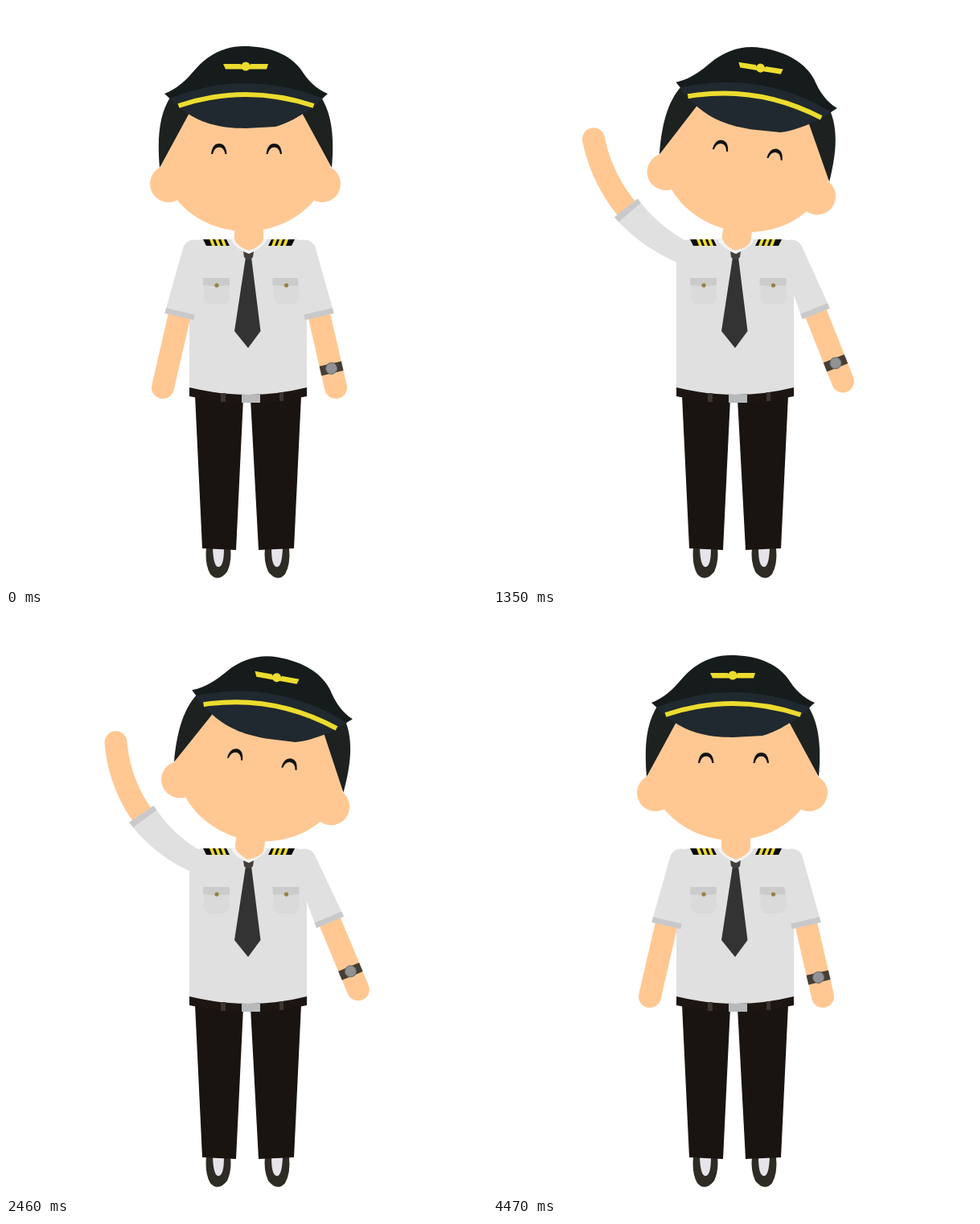
Write an HTML page that moves like this. It is 598 px wide and 722 px high and loops after 4500 ms.

```html
<!DOCTYPE html>
<html lang="en">
<head>
<meta charset="utf-8">
<title>Waving pilot</title>
<style>
  html, body { margin: 0; width: 100%; height: 100%; overflow: hidden; background: #fff; }
  svg { display: block; width: 598px; height: 722px; }
  .skin { fill: #ffc893; }
  .shirt { fill: #e0e0e0; }
  .cuff { fill: #c9c9cb; }
  .yellow { fill: #ecdc2f; }
  .hair { fill: #1d2120; }
  .cap { fill: #161b1b; }
  .pants { fill: #1a1410; }
  .fore { fill: none; stroke: #ffc893; stroke-width: 28; stroke-linecap: round; }
</style>
</head>
<body>
<svg viewBox="0 0 598 722">
  <defs>
    <g id="shoe">
      <path fill="#2d2b23" d="M249 673H279Q281 690 275 703Q264 717 254 706Q247 694 249 673z"/>
      <path fill="#e6e4ea" d="M257 674H271Q271 697 264 697Q258 697 257 674z"/>
    </g>
    <g id="pocket">
      <path fill="#dadada" d="M246 345H278V365L272 371H252L246 365z"/>
      <path fill="#cbcbcb" d="M245 338H278V347L265 348L262 351L259 348L245 347z"/>
      <circle cx="262" cy="347" r="2.6" fill="#96813f"/>
    </g>
    <g id="epaulet">
      <path fill="#08090f" d="M245 290H274L278 298H249z"/>
      <path class="yellow" d="M253 290h4l3 8h-4zM260 290h4l3 8h-4zM267 290h4l3 8h-4z"/>
    </g>
    <path id="eye" d="M255 184Q256.500 171 265 171Q273.500 171 274.500 184H272.500Q271 175.500 265 175.500Q259 175.500 257 184z" fill="#111"/>
  </defs>

  <use href="#shoe"/>
  <use href="#shoe" transform="matrix(-1 0 0 1 601 0)"/>
  <path class="pants" d="M235 484L295 488L286 676L244 674zM304 488L367 484L358 674L314 676z"/>

  <path class="shirt" d="M228 302Q232 290 245 290H359Q372 290 374 302V476Q302 492 228 476z"/>
  <path fill="#1c1512" d="M228 474Q302 492 374 474V485Q302 501 228 485z"/>
  <path fill="#3b3531" d="M267 481h6v11h-6zM340 480h5v11h-5z"/>
  <path fill="#b7b9ba" d="M293 483H316V493H293z"/>
  <use href="#pocket"/>
  <use href="#pocket" x="86.500"/>

  <g id="left"></g>
  <g id="right" transform="matrix(-1 0 0 1 605 0)"></g>

  <use href="#epaulet"/>
  <use href="#epaulet" transform="matrix(-1 0 0 1 604 0)"/>
  <path fill="#f3f3f3" d="M280 289Q280 298 302 308Q324 298 324 289z"/>

  <g id="head">
    <path class="skin" d="M284 265H320V290Q318 298 302 304Q286 298 284 290z"/>
    <circle class="skin" cx="202" cy="221" r="23"/>
    <circle class="skin" cx="393" cy="221" r="23"/>
    <path class="skin" d="M190 175C190 242 244 280 298 280S406 242 406 175L380 110H216z"/>
    <path class="hair" d="M229 131L191 201C188 165 190 135 205 112H245zM367 131L405 201C408 165 406 135 391 112H351z"/>
    <path class="cap" d="M197 109C213 103 224 92 236 78C252 60 272 50 295 50C328 50 352 60 366 78C375 92 385 103 400 109L390 118H207z"/>
    <path fill="#20292f" d="M203 115L210 122C238 145 262 152 298 152L335 150C350 146 365 137 382 126L394 115Q298 77 203 115z"/>
    <path fill="none" stroke="#ecdc2f" stroke-width="6" d="M214.500 124Q298 96 382.500 124"/>
    <path class="yellow" d="M270 72H326L324 78.500H273z"/>
    <circle class="cap" cx="298" cy="70" r="6.500"/>
    <circle class="yellow" cx="298" cy="75" r="5.500"/>
    <use href="#eye"/>
    <use href="#eye" x="68.500"/>
  </g>

  <path fill="#333" d="M298 312H305L316.500 404L301 425L284 404z"/>
  <path fill="#443f3c" d="M295 305L302 308L308 305L307 312L304 315H299L296 312z"/>
</svg>
<script>
const $ = id => document.getElementById(id);
const clamp = x => Math.min(1, Math.max(0, x));
const smooth = x => (x = clamp(x)) * x * (3 - 2 * x);
const rad = Math.PI / 180;
const LOOP = 4500, STEP = 30, REST = -77, PARTS = 50;

// Keys are [ms, value] pairs: chord elevation and bend of the waving arm, lean of the rest
const LIFT = [[735, REST], [1500, 67], [2010, 8.5], [2460, 57], [3300, REST]];
const BEND = [[980, 0], [1450, 60], [2010, 17], [2470, 58], [2900, 0]];
const LEAN = [[750, 0], [1500, 1], [2545, 1], [3300, 0]];

function ease(keys, t) {
  return keys.slice(1).reduce((v, [end, to], i) => {
    const [start, from] = keys[i];
    return t > start ? from + (to - from) * smooth((t - start) / (end - start)) : v;
  }, keys[0][1]);
}

const watch = `<g class="watch"><path fill="#453e35" d="M-14-6H14V6H-14z"/>
  <circle r="7" fill="#909294" stroke="#6b6b6b"/></g>`;
for (const id of ['left', 'right']) {
  $(id).innerHTML = `<path class="fore"/>${id === 'right' ? watch : ''}
    <circle class="shirt" cx="234" cy="305" r="14.500"/>
    <path class="shirt sleeve"/><path class="cuff"/>`;
}

// An arm is a circular arc from the shoulder; both sides share one shape
function drawArm(arm, lift, bend) {
  const len = 173.5 + 7 * clamp((lift - REST) / 80) ** 2 + 0.06 * bend;
  const pts = [];
  let x = 234, y = 305;
  for (let i = 0; i <= PARTS; i++) {
    const a = (lift + bend * (i / PARTS - 0.5)) * rad;
    const c = Math.cos(a), s = Math.sin(a);
    pts.push({ x, y, c, s, a });
    x -= c * len / PARTS;
    y -= s * len / PARTS;
  }
  const line = list => 'M' + list.map(p => p.map(v => v.toFixed(2))).join('L');
  const band = (from, to) => {
    const side = dir => pts.slice(from, to + 1).map((p, i) => {
      const w = dir * (14.5 + (from + i) / 6);
      return [p.x + p.s * w, p.y - p.c * w];
    });
    return line([...side(1), ...side(-1).reverse()]) + 'z';
  };
  const set = (sel, d) => arm.querySelector(sel).setAttribute('d', d);
  set('.fore', line(pts.slice(20).map(p => [p.x, p.y])));
  set('.sleeve', band(0, 23));
  set('.cuff', band(22, 24));
  const w = arm.querySelector('.watch'), p = pts[43];
  if (w) w.setAttribute('transform', `translate(${p.x} ${p.y}) rotate(${p.a / rad + 90})`);
}

function draw(now) {
  const t = Math.floor(now % LOOP / STEP) * STEP;
  const lean = ease(LEAN, t);
  $('head').setAttribute('transform', `rotate(${10.2 * lean} 302 292)`);
  drawArm($('left'), ease(LIFT, t), ease(BEND, t));
  drawArm($('right'), REST + 9.6 * lean, 0);
}

const start = performance.now();
function tick() {
  draw(performance.now() - start);
  requestAnimationFrame(tick);
}
tick();
</script>
</body>
</html>
```
